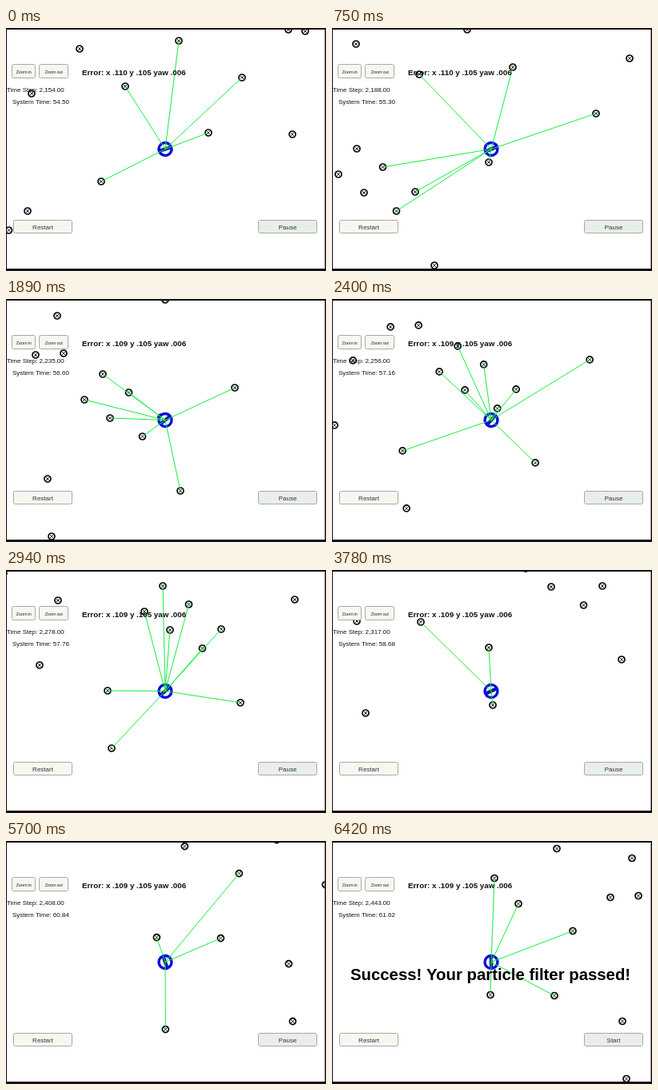
These frames come from a looping animation (400 px wide and 304 px high, 7.35 s). An HTML page with a canvas:

```html
<!DOCTYPE html>
<html lang="en">
<head>
<meta charset="utf-8">
<title>Particle filter</title>
<style>
html, body { margin: 0; width: 100%; height: 100%; overflow: hidden; background: #150a18; }
canvas { display: block; }
</style>
</head>
<body>
<canvas id="stage" width="400" height="304"></canvas>
<script>
const ctx = document.getElementById('stage').getContext('2d');
const LOOP = 7350, TICK = 30, END = 6420, RANGE = 145;
const CAR = { x: 199, y: 151.5 };
const FONT = '"Liberation Sans", Arial, sans-serif';

// time, map shift x, map shift y, step counter, system clock
const KEYS = [
  [0, 0, 0, 2154, 54.5],
  [750, 77, -24, 2188, 55.3],
  [1890, 167, -81, 2235, 56.6],
  [2940, 242, -155, 2278, 57.76],
  [3780, 311, -209, 2317, 58.68],
  [4350, 362, -221, 2343.5, 59.32],
  [4920, 413, -209.5, 2370, 59.96],
  [5250, 444, -192, 2386, 60.34],
  [6000, 476, -122, 2422.6, 61.16],
  [6420, 478, -80.5, 2443, 61.62]
];

const LANDMARKS = [
  [216, 16], [92, 26], [149, 73], [295, 62], [253, 131], [358, 133],
  [119, 192], [32, 82], [27, 229], [3.5, 253], [353, 2], [374, 4],
  [-47, 44], [-46, 175], [-13.5, 198], [-69, 207], [-37, 230], [51, 321],
  [-103, 102], [-115, 306], [-110, 378], [-130, 151], [-95, 149],
  [-177, 193], [-200, 274], [-245, 159], [-280, 273], [-269, 388],
  [-197, 90], [-275, 127]
];

const chord = (i, c) => (KEYS[i + 1][c] - KEYS[i][c]) / (KEYS[i + 1][0] - KEYS[i][0]);

function slope(i, c) {
  if (i === 0) return chord(0, c);
  if (i === KEYS.length - 1) return chord(i - 1, c);
  const before = KEYS[i][0] - KEYS[i - 1][0], after = KEYS[i + 1][0] - KEYS[i][0];
  return (chord(i - 1, c) * after + chord(i, c) * before) / (before + after);
}

// Cubic Hermite value of one column at time t
function track(t, c) {
  let i = 0;
  while (i < KEYS.length - 2 && t >= KEYS[i + 1][0]) i++;
  const a = KEYS[i], b = KEYS[i + 1], h = b[0] - a[0], u = (t - a[0]) / h, v = 1 - u;
  return a[c] * (1 + 2 * u) * v * v + b[c] * u * u * (3 - 2 * u)
    + h * u * v * (slope(i, c) * v - slope(i + 1, c) * u);
}

function text(str, x, y, size, { bold = false, align = 'left', spacing = 0, color = '#111' } = {}) {
  ctx.font = `${bold ? 'bold ' : ''}${size}px ${FONT}`;
  ctx.textAlign = align;
  ctx.letterSpacing = spacing + 'px';
  ctx.fillStyle = color;
  ctx.fillText(str, x, y);
}

function button(label, x, y, w, h, fill, size, spacing) {
  ctx.beginPath();
  ctx.roundRect(x + .5, y + .5, w - 1, h - 1, 2);
  ctx.fillStyle = fill;
  ctx.fill();
  ctx.lineWidth = 1;
  ctx.strokeStyle = '#aaa8a2';
  ctx.stroke();
  text(label, x + w / 2, y + h / 2 + 3, size, { align: 'center', spacing, color: '#333' });
}

function line(x1, y1, x2, y2) {
  ctx.beginPath();
  ctx.moveTo(x1, y1);
  ctx.lineTo(x2, y2);
  ctx.stroke();
}

function landmark(x, y) {
  ctx.strokeStyle = '#000';
  ctx.lineWidth = 1.7;
  ctx.beginPath();
  ctx.arc(x, y, 4, 0, 7);
  ctx.stroke();
  ctx.lineWidth = .9;
  line(x - 2.6, y - 2.6, x + 2.6, y + 2.6);
  line(x - 2.6, y + 2.6, x + 2.6, y - 2.6);
}

function car(heading) {
  ctx.save();
  ctx.translate(CAR.x, CAR.y);
  ctx.rotate(heading);
  ctx.fillStyle = '#fff';
  ctx.strokeStyle = '#0a0ae0';
  ctx.lineWidth = 3.4;
  ctx.beginPath();
  ctx.arc(0, 0, 8, 0, 7);
  ctx.fill();
  ctx.stroke();
  ctx.fillStyle = '#0a0ae0';
  ctx.fillRect(-7, -2.2, 14, 4.4);
  ctx.fillStyle = '#223';
  ctx.fillRect(-4, -1.5, 7, 3);
  ctx.restore();
}

function draw(t) {
  const done = t >= END;
  const dx = track(t, 1), dy = track(t, 2);
  const from = Math.max(0, t - TICK);
  const heading = Math.atan2(track(from + TICK, 2) - track(from, 2), track(from + TICK, 1) - track(from, 1));
  const marks = LANDMARKS.map(([x, y]) => [x + dx, y + dy]);

  ctx.fillStyle = '#150a18';
  ctx.fillRect(0, 0, 400, 304);
  ctx.save();
  ctx.beginPath();
  ctx.rect(1, 2, 397.5, 299);
  ctx.clip();
  ctx.fillStyle = '#fff';
  ctx.fillRect(0, 0, 400, 304);
  marks.forEach(([x, y]) => landmark(x, y));
  car(heading);
  ctx.strokeStyle = '#14ee3c';
  ctx.lineWidth = 1;
  for (const [x, y] of marks) {
    if (Math.hypot(x - CAR.x, y - CAR.y) < RANGE) line(CAR.x, CAR.y, x, y);
  }
  ctx.restore();

  const step = Math.round(track(t, 3)).toLocaleString('en-US');
  const clock = Math.round(track(t, 4) * 50) / 50;
  button('Zoom in', 7, 45, 30, 18, '#f8f6f1', 6, -.4);
  button('Zoom out', 41, 45, 37, 18, '#f8f6f1', 6, -.4);
  button('Restart', 9, 240, 74, 17, '#f8f6f1', 8, 0);
  button(done ? 'Start' : 'Pause', 315, 240, 74, 17, '#e8eee8', 8, 0);
  text(`Time Step: ${step}.00`, 1, 80, 8);
  text(`System Time: ${clock.toFixed(2)}`, 8, 95, 8);
  text(`Error: x ${t < 1300 ? '.110' : '.109'} y .105 yaw .006`, 95, 59, 9.8, { bold: true });
  if (done) text('Success! Your particle filter passed!', 23, 174, 20.35, { bold: true, color: '#000' });
}

function frame(now) {
  const t = Math.floor((now % LOOP) / TICK) * TICK;
  draw(Math.min(t, END));
  requestAnimationFrame(frame);
}
requestAnimationFrame(frame);
</script>
</body>
</html>
```
